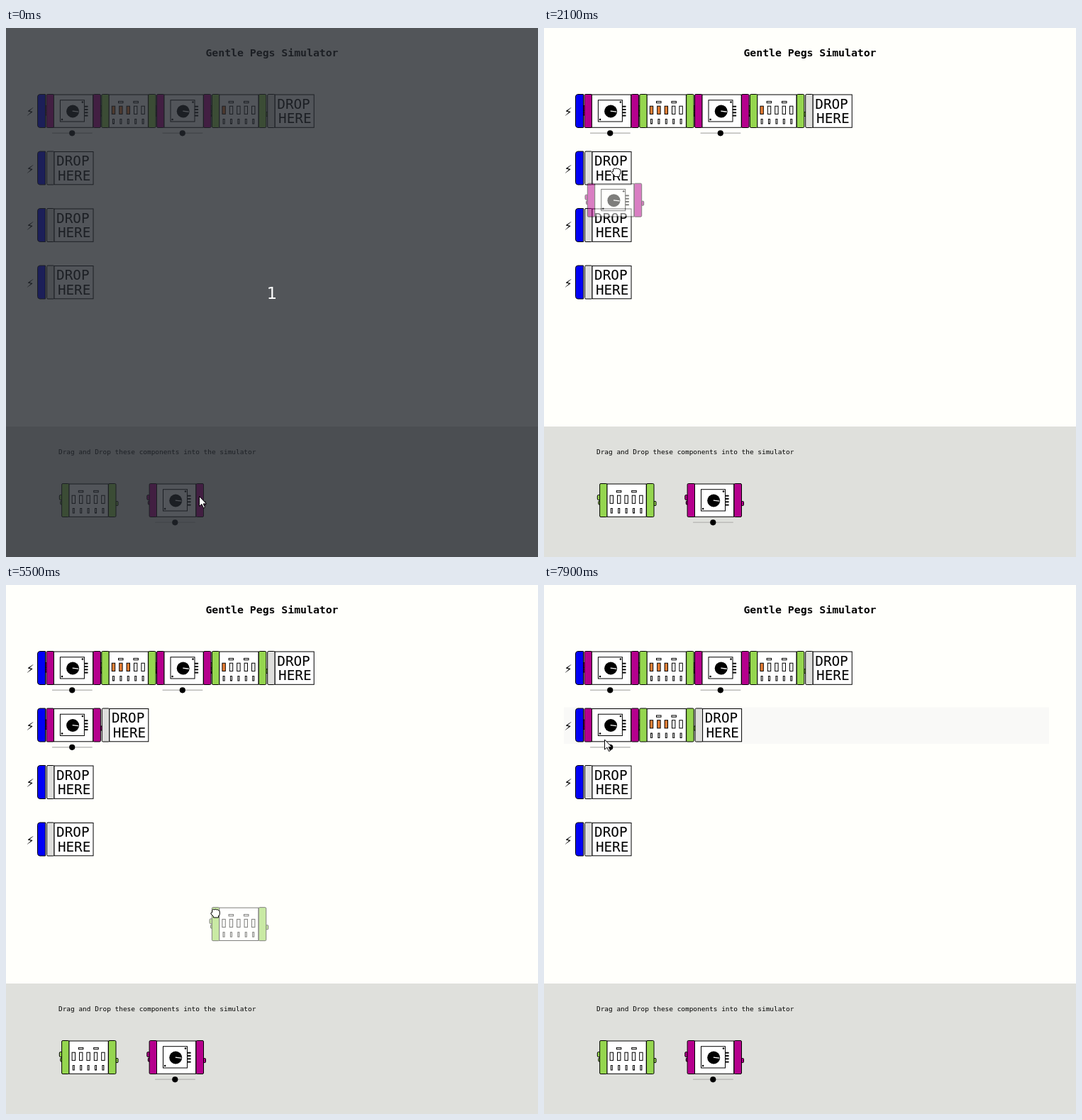
Write an HTML page that moves like this. It is 750 px wide and 746 px high and loops after 8 s.

```html
<!DOCTYPE html>
<html lang="en">
<head>
<meta charset="utf-8">
<title>Gentle Pegs Simulator</title>
<style>
  html, body { margin: 0; width: 100%; height: 100%; overflow: hidden; background: #fffffb; }
  svg { display: block; width: 750px; height: 746px; }
  text { font-family: "DejaVu Sans Mono", monospace; }
  .title { font-size: 14.8px; font-weight: bold; text-anchor: middle; }
  .hint { font-size: 9.45px; }
  .drop { font-size: 19.3px; }
  .bolt { font: 16px "DejaVu Sans", sans-serif; text-anchor: middle; }
  .count { font: 22.5px "DejaVu Sans", sans-serif; fill: #fff; text-anchor: middle; }
  .line { stroke: #000; }
  .ghost { opacity: .5; }
</style>
</head>
<body>
<svg viewBox="0 0 750 746">
  <rect width="750" height="746" fill="#fffffb"/>
  <rect y="562" width="750" height="184" fill="#dfe0dc"/>
  <rect id="hover" x="28" y="172.5" width="684" height="51.5" fill="#f9f9f7"/>
  <text class="title" x="375" y="40">Gentle Pegs Simulator</text>
  <text class="hint" x="74" y="601">Drag and Drop these components into the simulator</text>
  <g id="scene"></g>
  <g id="potGhost" class="ghost"></g>
  <g id="ledGhost" class="ghost"></g>
  <g id="veil">
    <rect width="750" height="746" fill="#24282e" fill-opacity=".79"/>
    <text class="count" x="375" y="382">1</text>
  </g>
  <path id="arrow" class="line" fill="#fff" d="M0 0V14L3.4 11L6 16.5L8 15.5L5.7 10.4H10Z"/>
  <path id="hand" class="line" fill="#fff"
    d="M-4.5-4.5Q-3-6.5-1.5-5Q0-6.5 1.5-5Q3-6 4-4.3Q6-4.5 6-2V1.5L4.3 4V6H-2.8V4.3L-6.3 1Q-6.8-1.5-4.5-1.2Z"/>
</svg>
<script>
const LOOP = 8000, TICK = 100;
const LEFT = 56.7, PITCH = 77.8, TOP = 93, ROW = 80.5, LED_GAP = 10.4;
const COLOR = { pot: '#b5008d', led: '#95d64f', power: '#0000f5', empty: '#dededc', lit: '#ee8136' };

const el = id => document.getElementById(id);
const repeat = (n, draw) => Array.from({ length: n }, (_, i) => draw(i)).join('');
const at = (x, y, content) => `<g transform="translate(${x} ${y})">${content}</g>`;
const box = (x, y, w, h, fill = '#fff', r = 0) =>
  `<rect class="line" x="${x}" y="${y}" width="${w}" height="${h}" rx="${r}" fill="${fill}"/>`;
const dot = (x, y, r) => `<circle cx="${x}" cy="${y}" r="${r}"/>`;
const stroke = (d, color, width) => `<path d="${d}" stroke="${color}" stroke-width="${width}"/>`;
const label = (type, x, y, text) => `<text class="${type}" x="${x}" y="${y}">${text}</text>`;

const bar = (x, fill) => box(x, .5, 10.5, 47, fill, 1.5);
const frame = fill => bar(.3, fill) + box(10.7, 1, 55.2, 46.3) + bar(66.2, fill);
const knobs = fill =>
  box(-3, 16.5, 4, 7, fill, 1.5) + box(-1.5, 25, 3, 5, fill, 1) + box(76.5, 25.5, 3.2, 6, fill, 1);

const slider = stroke('M8.3 55.3H65', '#bcbcba', 1.6) + dot(36.5, 55.3, 4.1);
const pot = frame(COLOR.pot) + box(19.7, 8.7, 34, 30.3) +
  dot(37.4, 24.5, 9) + stroke('M37 24.2L45.5 25.2', '#fff', 1.3) + dot(51.2, 11.5, 1.3) + dot(22.3, 36, 1.3) +
  repeat(4, i => stroke(`M53.5 ${17.7 + i * 4.3}h5.3`, '#000', 1.9));

const led = lit => frame(COLOR.led) + box(24, 10.4, 6.5, 2.3) + box(45.4, 10.4, 6.5, 2.3) +
  repeat(5, i => box(14.8 + i * LED_GAP, 17.2, 4.4, 11.2, i < lit ? COLOR.lit : '#fff') +
    box(16 + i * LED_GAP, 35.5, 2, 6.5));

const drop = bar(.8, COLOR.empty) + box(11.3, 1, 55, 46.3) +
  label('drop', 14.4, 20.7, 'DROP') + label('drop', 16.2, 41, 'HERE');
const power = label('bolt', 34, 31, '\u26A1\uFE0E') +
  `<path class="line" fill="${COLOR.power}" d="M55.5 .5V47.5H47.5Q44.5 47 44.5 44V4Q44.5 1 47.5 .5Z"/>`;

// Each part is 'pot' or a count of lit LEDs; a drop zone closes the row.
function row(n, parts = []) {
  const each = draw => parts.map((p, i) => at(LEFT + i * PITCH, 0, draw(p))).join('');
  return at(0, TOP + n * ROW,
    each(p => knobs(p === 'pot' ? COLOR.pot : COLOR.led)) + power +
    each(p => p === 'pot' ? pot + slider : led(p)) +
    at(LEFT + parts.length * PITCH, 0, drop));
}

const stages = [[], ['pot'], ['pot', 3]];
const potPiece = knobs(COLOR.pot) + pot;
const ledPiece = knobs(COLOR.led) + led(0);
el('scene').innerHTML = row(0, ['pot', 3, 'pot', 1]) +
  stages.map((parts, i) => `<g id="stage${i}">${row(1, parts)}</g>`).join('') +
  row(2) + row(3) + at(78.3, 642, ledPiece) + at(201.8, 642, potPiece + slider);
el('potGhost').innerHTML = potPiece;
el('ledGhost').innerHTML = ledPiece;

// A smooth curve through points that are evenly spaced in time.
function spline(points, k) {
  const last = points.length - 1;
  const i = Math.min(Math.floor(k * last), last - 1), u = k * last - i;
  const [a, b, c, d] = [-1, 0, 1, 2].map(o => points[Math.max(0, Math.min(last, i + o))]);
  return [0, 1].map(n => b[n] + u / 2 * (c[n] - a[n] +
    u * (2 * a[n] - 5 * b[n] + 4 * c[n] - d[n] + u * (3 * (b[n] - c[n]) + d[n] - a[n]))));
}

const trip = (start, end, points, power = 1) => ({
  start,
  pos(t) {
    const k = Math.max(0, Math.min(1, (t - start) / (end - start)));
    return spline(points, 1 - (1 - k) ** power);
  }
});

const potTrip = trip(900, 2500, [[204, 651], [253.8, 397.8], [89, 267], [61, 218.7], [58, 215]]);
const ledTrip = trip(5100, 6200, [[87, 661], [285, 470], [240, 314], [192.3, 244.5]]);
const pointerTrips = [
  trip(0, 600, [[272.5, 660.5], [246, 668]]),
  trip(900, 2500, [[247, 683], [298, 431.5], [130, 248], [102, 203.5], [98, 197]]),
  trip(2900, 3800, [[94, 196], [80, 220]]),
  trip(3800, 4000, [[80, 220], [74, 280]]),
  trip(4100, 5000, [[74, 280], [77, 668]], 3.8),
  trip(5100, 6200, [[92, 688], [290, 480], [248, 312], [198, 213.5]]),
  trip(6700, 7400, [[192, 212], [150, 230], [70, 213]]),
  trip(7700, 7900, [[70, 213], [85.5, 218]])
];

function show(id, on, pos) {
  el(id).style.display = on ? '' : 'none';
  if (pos) el(id).setAttribute('transform', `translate(${pos})`);
}

function draw(now) {
  const t = Math.floor((now % LOOP) / TICK) * TICK;
  const during = (a, b) => t >= a && t < b;
  const dragPot = during(900, 2700), dragLed = during(5100, 6500);
  const dragging = dragPot || dragLed;
  const stage = t < 2700 ? 0 : t < 6500 ? 1 : 2;
  const pointer = pointerTrips.findLast(p => p.start <= t).pos(t);
  stages.forEach((_, i) => show('stage' + i, i === stage));
  show('veil', t < 100);
  show('hover', during(3000, 3900) || t >= 6900);
  show('potGhost', dragPot, potTrip.pos(t));
  show('ledGhost', dragLed, ledTrip.pos(t));
  show('hand', dragging, pointer);
  show('arrow', !dragging, pointer);
}

let start;
function loop(now) {
  start ??= now;
  draw(now - start);
  requestAnimationFrame(loop);
}
draw(0);
requestAnimationFrame(loop);
</script>
</body>
</html>
```
